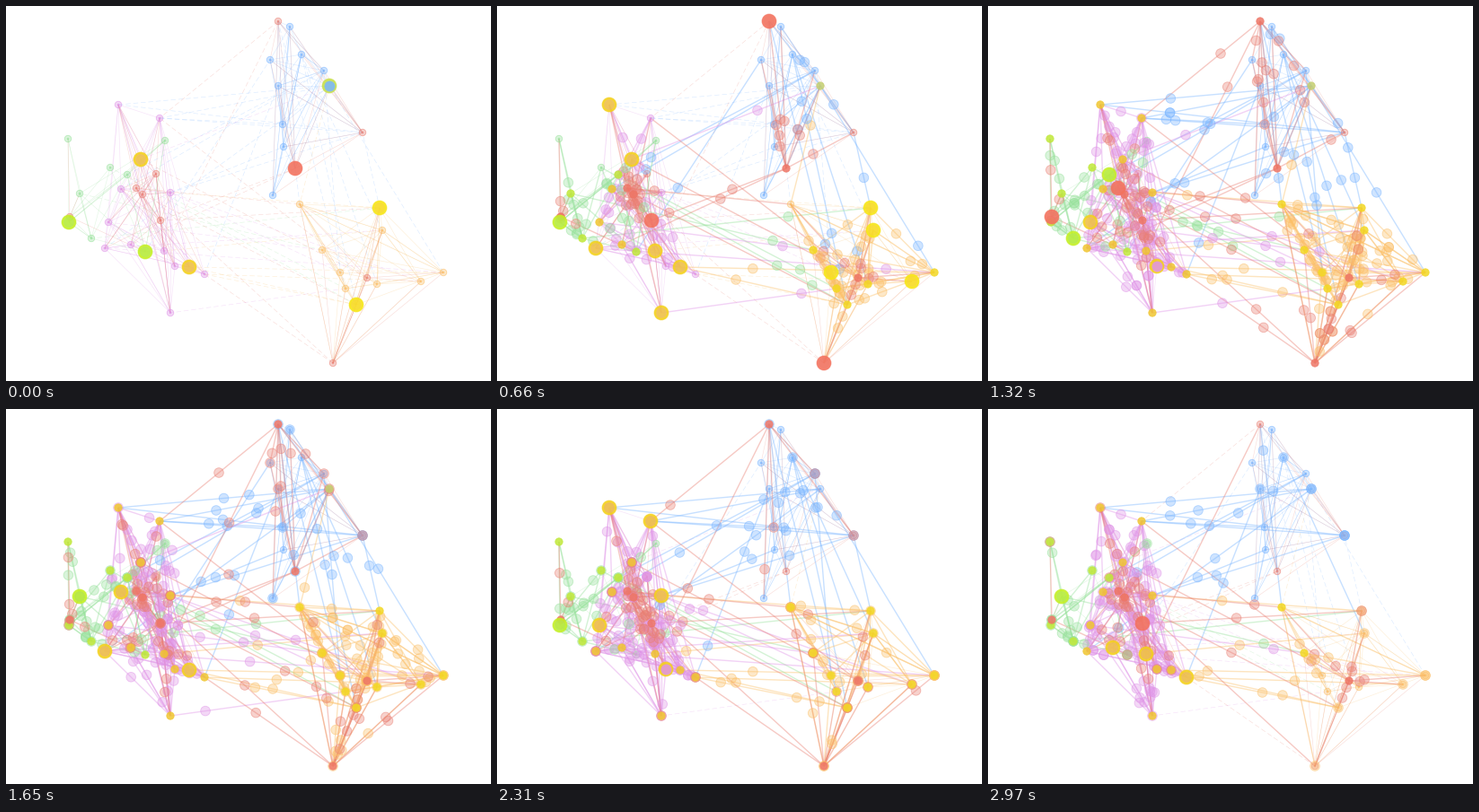
A matplotlib script that plays this animation: 540x418 px, repeating every 3.3 s.

```python
import math
import random

import matplotlib.pyplot as plt
from matplotlib.animation import ArtistAnimation
from matplotlib.collections import LineCollection
from matplotlib.colors import to_rgba

W, H, DPI = 540, 418, 100
FRAMES, INTERVAL = 10, 330
PX = 72 / DPI

# The last entries of each cluster are inhibitory (red) cells.
CLUSTERS = {
    "v": [(125, 110), (171, 125), (128, 204), (183, 208), (114, 241), (110, 270),
          (139, 266), (176, 273), (188, 290), (204, 291), (221, 299), (183, 342),
          (150, 171), (145, 203), (152, 210), (167, 187), (172, 239)],
    "g": [(69, 148), (116, 180), (135, 188), (82, 209), (70, 241), (95, 259),
          (155, 274), (177, 150), (71, 235)],
    "o": [(327, 221), (416, 225), (419, 250), (352, 272), (372, 297), (378, 315),
          (390, 333), (413, 310), (462, 307), (487, 297), (402, 303), (364, 398)],
    "b": [(316, 23), (294, 60), (329, 54), (303, 89), (354, 72), (360, 89),
          (308, 132), (309, 157), (297, 211), (303, 17), (322, 181), (397, 141)],
}
RED_COUNT = {"v": 4, "g": 1, "o": 2, "b": 3}
DENSITY = {"v": 0.34, "g": 0.45, "o": 0.45, "b": 0.5}
COLOR = {"v": "#e094e8", "g": "#98e29c", "o": "#fcc067", "b": "#7ab6ff", "r": "#ea8074"}
SPIKE = {"v": "#f4d11c", "g": "#c4f024", "o": "#f7e614", "b": "#c9e04a", "r": "#f4725e"}
RECENT = {"v": "#f0c630", "g": "#c0e838", "o": "#f3d822", "b": "#c4cf70", "r": "#ee7666"}

# Long connections: source, target, travel time in frames.
LONG = """
v0 b5 6  v0 b11 7  v1 b5 6  v1 b6 5  v1 b11 6  v2 b4 6  v3 b11 6  v3 b7 5
v5 b5 7  v10 b3 6  g2 b4 6  g6 b1 6
o6 b2 7  o7 b2 7  o5 b9 6  o2 b2 7  o1 b11 5  o0 b9 7  o4 b4 6  o9 b5 7
v9 o6 6  v9 o9 7  v3 o1 6  v7 o2 7  v10 o8 6  v10 o6 6
o1 g5 7  o3 g3 6  o6 g1 7  o5 g2 6
o3 v4 7  o9 v5 7  o2 v5 6  o8 v3 6  o4 v3 6  o5 v11 5
b5 v12 6  b5 o0 6  b10 v16 5  b10 v6 5  b9 v1 6  b9 v7 7
v14 o6 6  v16 o1 7  v13 o0 6  o10 v1 6  o10 v12 6
o11 g2 7  o11 v10 5  o11 o9 6
""".split()

# Cells that fire in each frame.
FIRING = [
    "v12 b5 b10 o1 g4 g6 v9 o6",
    "o9 o3 o10 o6 o5 o7 v2 v6 v4 v13 v14 g5 g2 g3 g8",
    "b9 v0 v5 v11 v7 v12 v9 g4 o1 o2 o4 o8 v16 o11",
    "v1 v3 v10 o0 g0 g1",
    "g2 v13 g8 v4 g5 v8",
    "v2 g3 v5 v9",
    "v6 v7 v12 v16 v10 v14 g1",
    "v0 v1 v3 g4 v4 v8",
    "v2 v9 v5 v13 o3 o10 g5 v11",
    "g3 v6 v7 v10 v16",
]
RINGS = {"v8", "b5"}

nodes, kind = {}, {}
for group, points in CLUSTERS.items():
    for i, point in enumerate(points):
        nodes[f"{group}{i}"] = point
        kind[f"{group}{i}"] = "r" if i >= len(points) - RED_COUNT[group] else group

fires = {name: [k for k, row in enumerate(FIRING) if name in row.split()] for name in nodes}


def build_edges():
    rng = random.Random(7)
    edges = {(a, b): int(n) for a, b, n in zip(LONG[::3], LONG[1::3], LONG[2::3])}
    for a in nodes:
        for b in nodes:
            if a == b or a[0] != b[0]:
                continue
            chance = 0.7 if kind[a] == "r" else DENSITY[a[0]]
            if rng.random() < chance:
                steps = round(4 + math.dist(nodes[a], nodes[b]) / 105)
                edges.setdefault((a, b), steps)
    return edges


edges = build_edges()


def edge_color(a, b):
    return COLOR["r"] if kind[a] == "r" else COLOR[b[0]]


def along(a, b, u):
    (x0, y0), (x1, y1) = nodes[a], nodes[b]
    return x0 + (x1 - x0) * u, y0 + (y1 - y0) * u


fig = plt.figure(figsize=(W / DPI, H / DPI), dpi=DPI, facecolor="white")
ax = fig.add_axes([0, 0, 1, 1])
ax.set_xlim(0, W)
ax.set_ylim(H, 0)
ax.axis("off")


def lines(items, width, alpha, style="solid"):
    segments = [(nodes[a], nodes[b]) for a, b in items]
    colors = [to_rgba(edge_color(a, b), alpha) for a, b in items]
    return ax.add_collection(LineCollection(
        segments, colors=colors, linewidths=width * PX, linestyles=style, zorder=1))


def discs(items, radius, face, rim, z):
    """items: list of (position, color)."""
    xs = [p[0] for p, _ in items]
    ys = [p[1] for p, _ in items]
    return ax.scatter(xs, ys, s=(2 * radius * PX) ** 2,
                      facecolors=[to_rgba(c, face) for _, c in items],
                      edgecolors=[to_rgba(c, rim) for _, c in items],
                      linewidths=0.9 * PX, zorder=z)


def draw(k):
    moving, active = [], []
    for (a, b), steps in edges.items():
        ages = [k - f for f in fires[a] if 0 < k - f <= steps]
        if ages:
            active.append((a, b))
        moving += [(along(a, b, age / steps), edge_color(a, b)) for age in ages]
    idle = [e for e in edges if e not in active]
    idle_local = [e for e in idle if e[0][0] == e[1][0]]
    idle_long = [e for e in idle if e[0][0] != e[1][0]]

    firing = [n for n in nodes if k in fires[n]]
    recent = [n for n in nodes if any(0 < k - f <= 6 for f in fires[n]) and n not in firing]
    resting = [n for n in nodes if n not in firing and n not in recent]

    def tinted(names, palette):
        return [(nodes[n], palette[kind[n]]) for n in names]

    plain = [n for n in firing if n not in RINGS]
    rings = [n for n in firing if n in RINGS]
    return [
        lines(idle_long, 0.6, 0.28, (0, (9, 5))),
        lines(idle_local, 0.6, 0.27),
        lines(active, 1.4, 0.42),
        discs(tinted(resting, COLOR), 3.7, 0.35, 0.6, 2),
        discs(tinted(resting, COLOR), 1.4, 0.6, 0, 2),
        discs(moving, 5.3, 0.36, 0.5, 3),
        discs(tinted(recent, RECENT), 4.2, 0.85, 0.7, 4),
        discs(tinted(firing, SPIKE), 8, 0.9, 0.6, 5),
        discs(tinted(plain, COLOR), 5.3, 0.22, 0.2, 6),
        discs(tinted(rings, COLOR), 5.6, 0.85, 0.6, 6),
    ]


anim = ArtistAnimation(fig, [draw(k) for k in range(FRAMES)],
                       interval=INTERVAL, repeat=True, repeat_delay=0)
plt.show()
```
